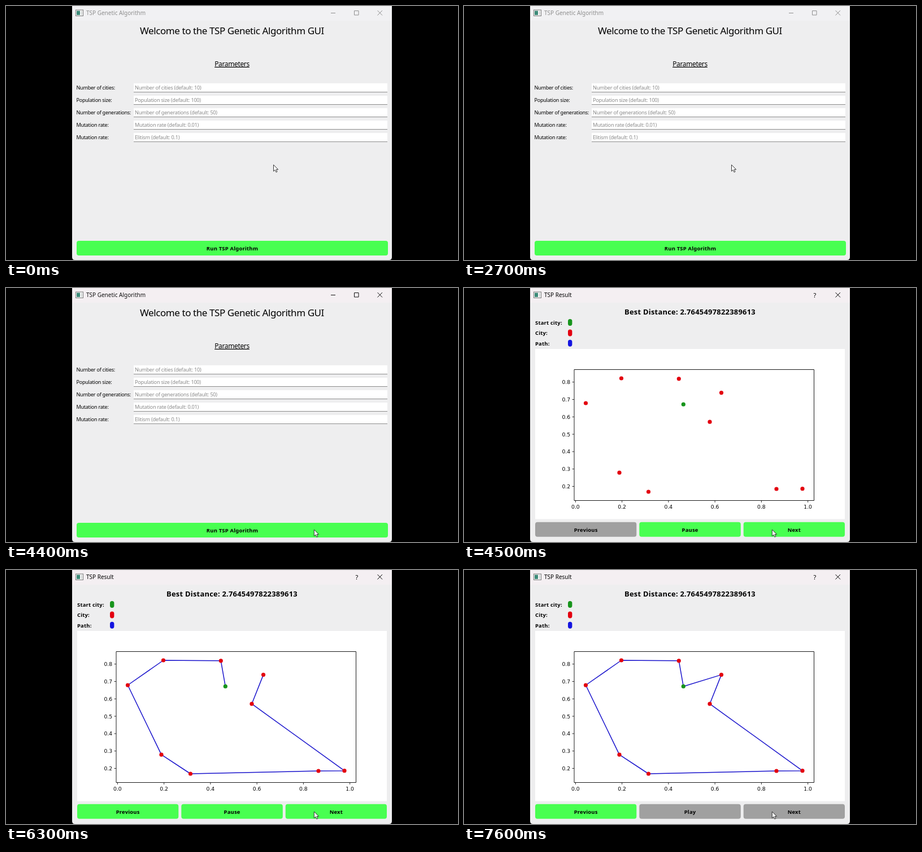
An HTML page for the animation above (7700 ms loop, 800x450 px).

```html
<!DOCTYPE html>
<html lang="en">
<head>
<meta charset="utf-8">
<title>TSP Genetic Algorithm</title>
<style>
html, body { margin: 0; width: 100%; height: 100%; overflow: hidden; background: #000; }
svg { display: block; }
text { font: 9px "Noto Sans", sans-serif; letter-spacing: -.025em; fill: #000; white-space: pre; }
.bold { font-size: 9.45px; font-weight: 700; letter-spacing: .02em; }
.bar { font-size: 10px; letter-spacing: 0; }
.hint { font-size: 9.15px; fill: #8a8a8a; }
.tick { font: 9.2px "DejaVu Sans", sans-serif; letter-spacing: 0; }
.mid { text-anchor: middle; }
.end { text-anchor: end; }
.line { fill: none; stroke: #000; }
</style>
</head>
<body>
<svg id="stage" width="800" height="450" viewBox="0 0 800 450">
  <path d="M117 0H683V445Q683 450 678 450H122Q117 450 117 445Z" fill="#eeeeef"/>
  <rect id="titleBar" x="117" width="566" height="26"/>
  <rect x="123.5" y="7" width="13" height="10.5" fill="#fff" stroke="#777"/>
  <rect x="125" y="8.5" width="6" height="7.5" fill="#3d8a78"/>
  <rect x="132.5" y="8.5" width="2.5" height="7.5" fill="#d5d8d8"/>
  <g id="main"></g>
  <g id="result"></g>
  <path id="pointer" d="M0 0V11.5L2.7 9.1 4.6 13.2 6.5 12.3 4.7 8.4H8.2Z" fill="#fff" stroke="#222" stroke-width=".9"/>
</svg>
<script>
const $ = id => document.getElementById(id);
const GREEN = '#48ff51', GREY = '#a0a0a0';
const LOOP = 7700, STEP = 100, FOCUS = 4300, OPEN = 4500;
const FIRST_EDGE = 4675, EDGE_GAP = 203, DONE = 6800;

const text = (x, y, str, cls = '', attrs = '') => `<text x="${x}" y="${y}" class="${cls}" ${attrs}>${str}</text>`;
const rect = (x, y, w, h, fill, attrs = '') => `<rect x="${x}" y="${y}" width="${w}" height="${h}" fill="${fill}" ${attrs}/>`;
const path = (d, attrs = '') => `<path class="line" d="${d}" ${attrs}/>`;
const button = (x, y, w, label, id) =>
  rect(x, y, w, 26, GREEN, `rx="4" id="${id}"`) +
  text(x + w / 2, y + 16.8, label, 'bold mid', `id="${id}Text"`);
const CLOSE = 'M657.5 8L666 16.5M666 8L657.5 16.5';

// Parameter window
const fields = [
  ['Number of cities:', 'Number of cities (default: 10)'],
  ['Population size:', 'Population size (default: 100)'],
  ['Number of generations:', 'Number of generations (default: 50)'],
  ['Mutation rate:', 'Mutation rate (default: 0.01)'],
  ['Mutation rate:', 'Elitism (default: 0.1)']
];
$('main').innerHTML =
  text(142, 16.3, 'TSP Genetic Algorithm', 'bar', 'id="title"') +
  path('M575 12.5H583M616.5 8.5H624V16H616.5Z' + CLOSE, 'id="controls"') +
  text(400, 50, 'Welcome to the TSP Genetic Algorithm GUI', 'mid', 'style="font-size:17px"') +
  text(400, 106.8, 'Parameters', 'mid', 'style="font-size:11.9px;text-decoration:underline"') +
  fields.map(([label, hint], i) => {
    const y = 137 + i * 22;
    return text(124.5, y + 11, label) + rect(226, y, 449, 15, '#fff') +
      rect(226, y + 15, 449, 1, '#8c8c8c') + text(228, y + 11, hint, 'hint');
  }).join('') +
  button(125, 416, 551, 'Run TSP Algorithm', 'run');

// Result window
const cities = [[388.3, 206.2], [380.3, 160.8], [278.5, 160], [215.5, 204], [275, 327.2],
  [326.5, 361], [553, 356], [599, 355.7], [435, 237.2], [455.5, 185.6]];
const legend = [['Start city:', '#17941c'], ['City:', '#e3000f'], ['Path:', '#1414e0']];
let plot = '';
for (let i = 0; i < 6; i++) {
  const x = 197.4 + i * 82.25;
  plot += path(`M${x} 376.5v3.5`, 'stroke-width=".8"') + text(x, 391, (i / 5).toFixed(1), 'tick mid');
}
for (let i = 2; i < 9; i++) {
  const y = 351.5 - (i - 2) * 30.8;
  plot += path(`M195 ${y}h-3.5`, 'stroke-width=".8"') + text(188, y + 3.4, (i / 10).toFixed(1), 'tick end');
}
$('result').innerHTML =
  text(142, 16.3, 'TSP Result', 'bar') + text(621, 16.5, '?', 'bar mid', 'style="font-size:11px"') + path(CLOSE) +
  text(400, 47.4, 'Best Distance: 2.7645497822389613', 'bold mid', 'style="font-size:12.88px"') +
  legend.map(([label, color], i) =>
    text(126, 65 + i * 18.4, label, 'bold') + rect(184, 55 + i * 18.4, 7.4, 12, color, 'rx="3.7"')).join('') +
  rect(126, 108, 548, 301.5, '#fff') + plot +
  path('', 'id="route" style="stroke:#1a14cc;stroke-width:1.5;stroke-linejoin:round"') +
  path('M195 144.5H619.5V376.5H195Z', 'stroke-width=".9"') +
  cities.map(([x, y], i) => `<circle cx="${x}" cy="${y}" r="3.6" fill="${legend[i ? 1 : 0][1]}"/>`).join('') +
  button(126, 414.8, 179.3, 'Previous', 'prev') +
  button(310.3, 414.8, 179.5, 'Pause', 'play') +
  button(494.7, 414.8, 179.3, 'Next', 'next');

// Pointer stops: time, x, y
const stops = [[0, 473.5, 281.3], [3200, 473.5, 281.3], [3400, 480, 303], [3700, 501.3, 357.3],
  [4000, 534, 420], [4200, 545.3, 428], [LOOP, 545.3, 428]];

function pointerAt(t) {
  const i = stops.findIndex(s => s[0] > t);
  const a = stops[i - 1], b = stops[i], k = (t - a[0]) / (b[0] - a[0]);
  return [1, 2].map(n => a[n] + (b[n] - a[n]) * k);
}

function draw(t) {
  const open = t >= OPEN, active = t >= FOCUS, done = t >= DONE;
  const edges = Math.max(0, Math.min(10, Math.floor((t - FIRST_EDGE) / EDGE_GAP) + 1));
  $('main').style.display = open ? 'none' : '';
  $('result').style.display = open ? '' : 'none';
  $('titleBar').style.fill = active ? '#f4eff2' : '#f1f1f3';
  $('title').style.fill = $('controls').style.stroke = active ? '#111' : '#8e8e8e';
  const points = [...cities, cities[0]].slice(0, edges + 1);
  $('route').setAttribute('d', 'M' + points.join('L'));
  $('prev').style.fill = edges ? GREEN : GREY;
  $('play').style.fill = $('next').style.fill = done ? GREY : GREEN;
  $('playText').textContent = done ? 'Play' : 'Pause';
  $('pointer').setAttribute('transform', `translate(${pointerAt(t)})`);
}

const start = performance.now();
function tick() {
  const t = (performance.now() - start) % LOOP;
  draw(Math.floor(t / STEP) * STEP);
  requestAnimationFrame(tick);
}
tick();
</script>
</body>
</html>
```
